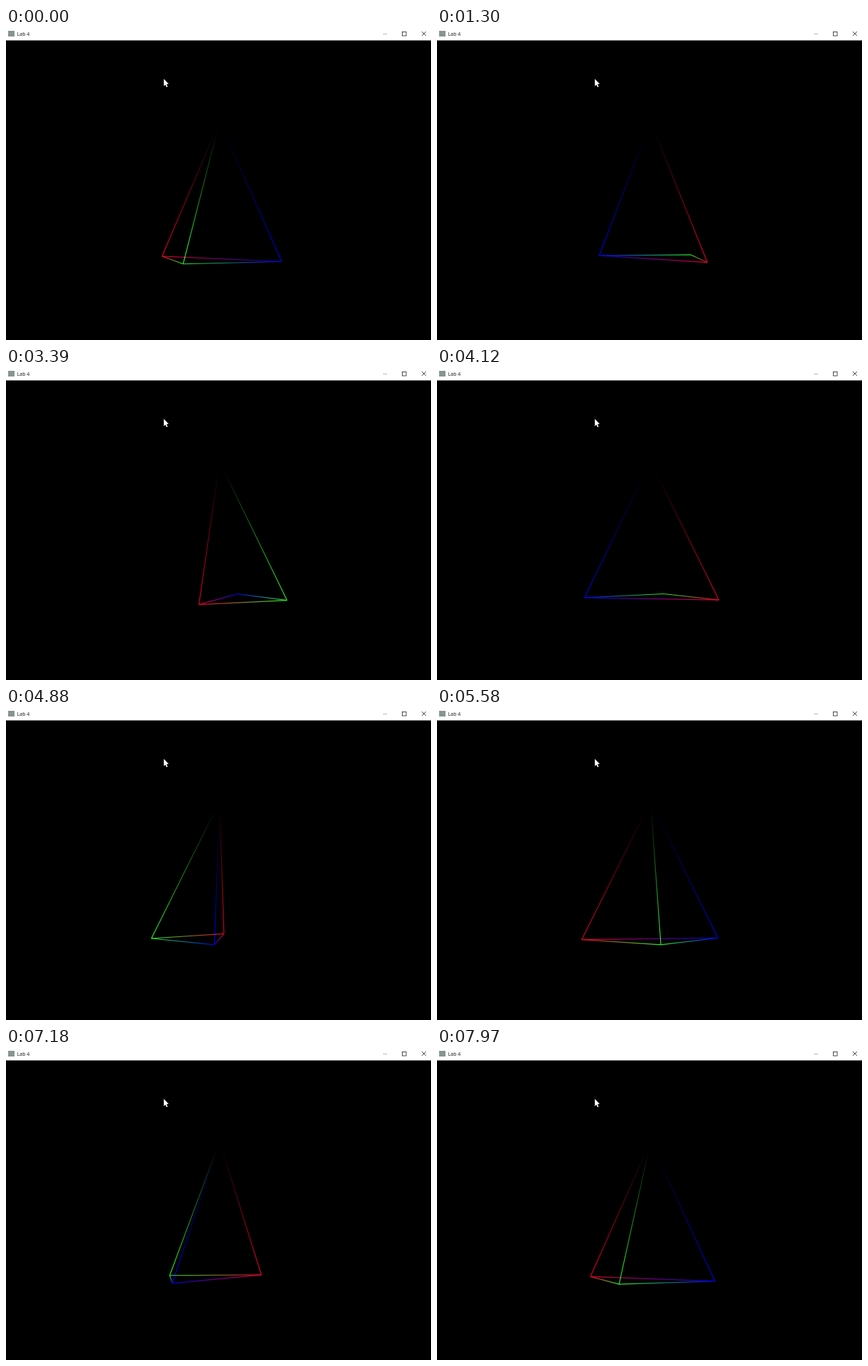
An HTML page with a canvas for the animation above (8 s loop, 600x440 px).

```html
<!DOCTYPE html>
<html>
<head>
<meta charset="utf-8">
<style>
  html, body { margin: 0; width: 100%; height: 100%; overflow: hidden; background: #000; }
  canvas { display: block; }
</style>
</head>
<body>
<canvas id="stage" width="600" height="440"></canvas>
<script>
const ctx = document.getElementById('stage').getContext('2d');
const LOOP = 8000;
const CX = 301.5, CY = 229, SIZE = 97, PERSPECTIVE = 0.08;

// Turn of the green corner in degrees: [ms, angle]
const TURN = [[0, -29.7], [1300, 141.6], [2240, 268.8], [3390, 433.8],
              [4880, 625.9], [6300, 832.6], [7970, 1054.7], [LOOP, 1058.8]];

const COLORS = ['#d90026', '#2ee62e', '#0000d2', '#000'];
const APEX = 3;
// The first face is the base, which is always outlined
const FACES = [[0, 1, 2], [0, 1, APEX], [1, 2, APEX], [2, 0, APEX]];

function angleAt(t) {
  const i = TURN.findIndex(k => k[0] > t);
  const [t0, a0] = TURN[i - 1], [t1, a1] = TURN[i];
  return a0 + (a1 - a0) * (t - t0) / (t1 - t0);
}

function corner(degrees) {
  const a = degrees * Math.PI / 180;
  const scale = SIZE / (1 - PERSPECTIVE * Math.cos(a));
  return [CX + Math.sin(a) * scale, CY + scale * 0.995];
}

function facesViewer([a, b, c]) {
  return (b[0] - a[0]) * (c[1] - a[1]) - (b[1] - a[1]) * (c[0] - a[0]) < 0;
}

function path(points, close) {
  ctx.beginPath();
  points.forEach(p => ctx.lineTo(...p));
  if (close) ctx.closePath();
}

function drawEdge(points, i, j) {
  const shade = ctx.createLinearGradient(...points[i], ...points[j]);
  shade.addColorStop(0, COLORS[i]);
  shade.addColorStop(j === APEX ? 0.94 : 1, COLORS[j]);
  ctx.strokeStyle = shade;
  path([points[i], points[j]]);
  ctx.stroke();
}

function drawPyramid(angle) {
  const points = [corner(angle - 90), corner(angle), corner(angle + 90), [CX, CY - SIZE]];
  const edges = new Set();
  FACES.forEach((face, n) => {
    if (n && !facesViewer(face.map(i => points[i]))) return;
    face.forEach((i, k) => {
      const j = face[(k + 1) % 3];
      edges.add(Math.min(i, j) * 4 + Math.max(i, j));
    });
  });
  ctx.lineWidth = 1.2;
  ctx.globalCompositeOperation = 'lighten';
  edges.forEach(e => drawEdge(points, e >> 2, e & 3));
  ctx.globalCompositeOperation = 'source-over';
}

function drawTitleBar() {
  ctx.fillStyle = '#fff';
  ctx.fillRect(0, 0, 600, 17.5);
  ctx.fillStyle = '#87958f';
  ctx.fillRect(3, 4, 9, 8);
  ctx.fillStyle = '#111';
  ctx.font = '7px "Open Sans", sans-serif';
  ctx.fillText('Lab 4', 15.7, 10.7);

  ctx.lineWidth = 0.8;
  ctx.strokeStyle = '#aaa';
  path([[532, 8.5], [538, 8.5]]);
  ctx.stroke();
  ctx.strokeStyle = '#222';
  ctx.strokeRect(559.5, 5.5, 5.5, 5.5);
  path([[587, 5], [593, 11]]);
  ctx.stroke();
  path([[593, 5], [587, 11]]);
  ctx.stroke();
}

function drawCursor() {
  ctx.fillStyle = '#fff';
  path([[222.8, 71.8], [222.8, 82], [225.1, 79.9], [226.7, 83.4],
        [228.2, 82.7], [226.7, 79.3], [229.7, 79]], true);
  ctx.fill();
}

function draw(now) {
  ctx.fillStyle = '#000';
  ctx.fillRect(0, 0, 600, 440);
  drawPyramid(angleAt(now % LOOP));
  drawTitleBar();
  drawCursor();
  requestAnimationFrame(draw);
}
requestAnimationFrame(draw);
</script>
</body>
</html>
```
